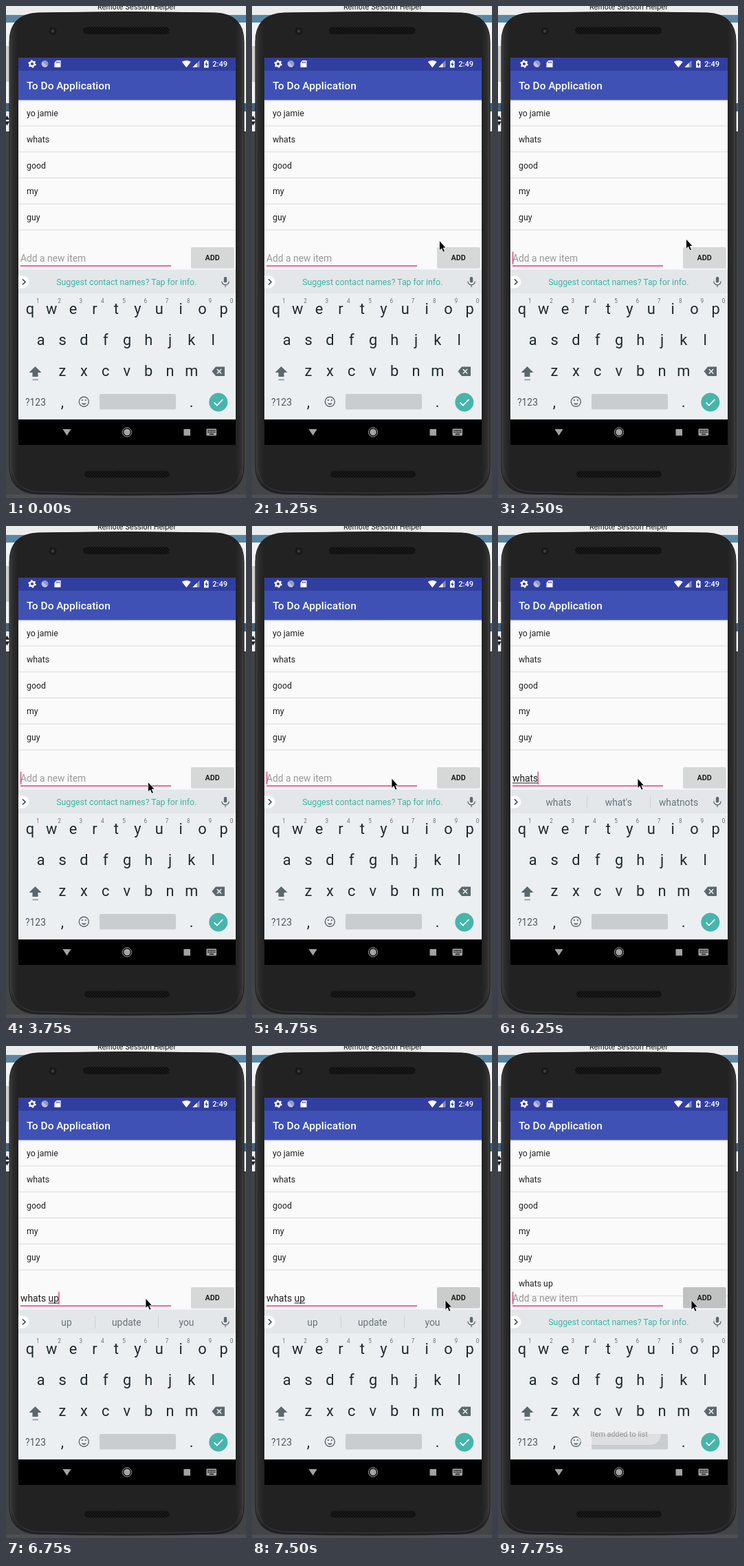
Recreate the animation shown at these times as an HTML page. Size 349x714 px, loop 8 s.

```html
<!DOCTYPE html>
<html lang="en">
<head>
<meta charset="utf-8">
<title>To Do Application</title>
<style>
html, body { margin: 0; width: 100%; height: 100%; overflow: hidden; background: #434446; }
svg { display: block; width: 349px; height: 714px; font-family: Roboto, Arial, sans-serif; }
text { white-space: pre; }
.mid { text-anchor: middle; }
.list { font-size: 12.3px; fill: #212121; }
.field { font-size: 13.84px; fill: #212121; }
.hint { fill: #999; }
.tip { font-size: 12.3px; fill: #3db3a6; }
.word { font-size: 13.84px; fill: #67747b; }
.key { font-size: 21.8px; fill: #1f2b31; }
.digit { font-size: 8.2px; fill: #667278; }
.mode { font-size: 13.9px; fill: #4c5960; }
.strong { font-weight: 500; }
</style>
</head>
<body>
<svg viewBox="0 0 349 714">
  <defs>
    <linearGradient id="body">
      <stop offset="0" stop-color="#454545"/>
      <stop offset=".012" stop-color="#2e2e2e"/>
      <stop offset=".035" stop-color="#222"/>
      <stop offset=".965" stop-color="#222"/>
      <stop offset=".988" stop-color="#2e2e2e"/>
      <stop offset="1" stop-color="#454545"/>
    </linearGradient>
    <linearGradient id="shade" x2="0" y2="1">
      <stop offset="0" stop-opacity=".09"/>
      <stop offset="1" stop-opacity="0"/>
    </linearGradient>
    <pattern id="mesh" width="4" height="4" patternUnits="userSpaceOnUse">
      <rect width="4" height="4" fill="#0e0e0e"/>
      <circle cx="1" cy="1" r=".8" fill="#272727"/>
      <circle cx="3" cy="3" r=".8" fill="#272727"/>
    </pattern>
  </defs>

  <g id="desktop"></g>
  <text x="133" y="5" font-family="Inter, Arial, sans-serif" font-size="10.4" fill="#111">Remote Session Helper</text>

  <path d="M5 52Q5 12 46 10Q175 7 305 10Q346 12 346 52V668Q346 706 306 708Q175 712 45 708Q5 706 5 668Z" fill="url(#body)" stroke="#1b1b1b"/>
  <path d="M9 672Q12 702 46 705Q175 708.500 305 705Q339 702 342 672" fill="none" stroke="#3b3b3b"/>
  <rect x="112" y="30.500" width="126" height="10.500" rx="5" fill="url(#mesh)"/>
  <rect x="114" y="674.500" width="124" height="10" rx="5" fill="url(#mesh)"/>
  <circle cx="68" cy="36.500" r="5.500" fill="#18191a"/>
  <circle cx="68" cy="36.500" r="2.200" fill="#35404a"/>

  <rect x="18" y="75" width="316" height="562" fill="#fafafa"/>
  <rect x="18" y="75" width="316" height="19" fill="#303f9f"/>
  <rect x="18" y="94" width="316" height="42.500" fill="#3f51b5"/>
  <rect x="18" y="136.500" width="316" height="2.500" fill="url(#shade)"/>
  <text class="strong" x="30" y="121" font-size="15.5" fill="#fff">To Do Application</text>
  <g fill="#fff" transform="translate(0 -.5)">
    <circle cx="38" cy="84.500" r="3.300" fill="none" stroke="#fff" stroke-width="2.400"/>
    <circle cx="38" cy="84.500" r="4.900" fill="none" stroke="#fff" stroke-width="1.700" stroke-dasharray="2.400 2.731"/>
    <circle cx="56.500" cy="84.500" r="5" fill="#8f99cf"/>
    <path d="M53 81A5 5 0 0 0 60 88Z" fill="#b9c0e2"/>
    <path d="M79.500 79.500H73.500L70.500 82.500V89.500H79.500Z"/>
    <path d="M73.500 81v2.500M75.500 81v2.500M77.500 81v2.500" stroke="#303f9f"/>
    <path d="M255.800 81.500Q262.300 77.500 268.800 81.500L262.300 89.700Z"/>
    <path d="M281.500 79.300V89.500H271.300Z" opacity=".4"/>
    <path d="M277.500 83.300V89.500H271.300Z"/>
    <path d="M290 79h2.600v1.200h2V90h-6.600V80.200h2Z"/>
    <path d="M291.800 81.500L289.200 85.800H291V88.800L293.600 84.500H291.800Z" fill="#303f9f"/>
    <text class="strong" x="300.300" y="88.500" font-size="11">2:49</text>
  </g>
  <g id="list"></g>
  <path d="M21 377.200H240" stroke="#e04079" stroke-width="1.500"/>
  <text class="field hint" id="hint" x="21" y="371">Add a new item</text>
  <text class="field" id="typed" x="21" y="371"></text>
  <path id="composing" stroke="#212121"/>
  <path id="caret" stroke="#e0447a" stroke-width="1.400"/>
  <rect x="269" y="351" width="62.500" height="30" rx="2" fill="#000" opacity=".13"/>
  <rect id="button" x="269" y="350" width="62.500" height="30" rx="2"/>
  <text class="mid" x="300.200" y="369" font-size="10.8" font-weight="700" fill="#212121">ADD</text>

  <rect x="18" y="382.500" width="316" height="217.500" fill="#eceff1"/>
  <rect x="18" y="382.500" width="316" height="34.500" fill="#e4e7e9"/>
  <path d="M18 391.500H24.500A9 9 0 0 1 24.500 409.500H18Z" fill="#fff"/>
  <path d="M24 396.500L28 400.500L24 404.500" fill="none" stroke="#37474f" stroke-width="1.600"/>
  <text class="tip mid" id="tip" x="175.300" y="405">Suggest contact names? Tap for info.</text>
  <g id="words"><path d="M129.500 391V410M221.500 391V410" stroke="#ccd1d4"/></g>
  <rect x="316.800" y="393" width="4.400" height="8.500" rx="2.200" fill="#5d6a71"/>
  <path d="M313.800 399.500A5.200 5.200 0 0 0 324.200 399.500M319 404.700V408" fill="none" stroke="#5d6a71" stroke-width="1.300"/>
  <g id="keys"></g>
  <g fill="#5c686e">
    <path d="M42.500 523L51.500 532H46.500V538H38.500V532H33.500Z"/>
    <rect x="38.500" y="541.500" width="8.500" height="1.800" fill="#93a0a6"/>
    <path d="M305 523.500H318V537H305L299.500 530.200Z"/>
    <path d="M306.800 527L313.200 533.500M313.200 527L306.800 533.500" stroke="#eceff1" stroke-width="1.600"/>
  </g>
  <g fill="none" stroke="#5c686e" stroke-width="1.400">
    <circle cx="113.300" cy="574.300" r="7"/>
    <path d="M109.500 576.500Q113.300 581 117.100 576.500Z" fill="#5c686e" stroke="none"/>
    <path d="M110.800 571v2M115.800 571v2" stroke-width="1.800"/>
  </g>
  <rect x="136" y="563" width="111" height="22.500" rx="2" fill="#c9cdcf"/>
  <circle cx="308.800" cy="575" r="13.500" fill="#48b5aa"/>
  <path d="M302.500 575.300L306.800 579.600L315.300 571" fill="none" stroke="#fff" stroke-width="1.700"/>

  <rect x="18" y="600" width="316" height="37"/>
  <g fill="#a3a3a3">
    <path d="M82.500 614H94.500L88.500 623.500Z"/>
    <circle cx="176" cy="618.500" r="4.800"/>
    <circle cx="176" cy="618.500" r="6.600" fill="none" stroke="#a3a3a3"/>
    <rect x="258.500" y="614" width="9.500" height="9.500"/>
    <rect x="291.500" y="613.500" width="14.500" height="10" rx="1.200"/>
    <path d="M293.500 616H304.500M293.500 618.500H304.500" stroke="#000" stroke-width="1.400" stroke-dasharray="1.500 .9"/>
    <path d="M295.800 621.300H302" stroke="#000" stroke-width="1.200"/>
  </g>
  <g id="toast" opacity=".55">
    <rect x="115" y="549" width="122" height="31" rx="15.500" opacity=".06"/>
    <rect x="115" y="548" width="122" height="31" rx="15.500" fill="#eee"/>
    <text class="mid" x="176" y="567" font-size="10.8" fill="#555">Item added to list</text>
  </g>
  <path id="pointer" d="M0 0V14.400L3.200 11.400L5.500 16.800L7.900 15.700L5.700 10.500H9.700Z" stroke="#fff" stroke-width=".8"/>
</svg>
<script>
const $ = id => document.getElementById(id);

function add(parent, tag, attrs, content = "") {
  const el = document.createElementNS("http://www.w3.org/2000/svg", tag);
  for (const k in attrs) el.setAttribute(k, attrs[k]);
  el.textContent = content;
  parent.appendChild(el);
  return el;
}
const show = (el, on) => { el.style.display = on ? "" : "none"; };

// Desktop strips that peek out around the phone: x, y, width, height, colour
[
  [0, 0, 349, 13, "#ececec"], [0, 13, 349, 11, "#5b86a3"],
  [0, 24, 349, 117, "#f3f3f3"], [0, 58, 8, 52, "#cfcdc9"],
  [0, 141, 349, 12, "#3f6484"], [0, 153, 349, 29, "#f4f4f4"],
  [0, 182, 349, 532, "#434446"], [0, 709, 349, 5, "#4c4f54"]
].forEach(([x, y, width, height, fill]) => add($("desktop"), "rect", { x, y, width, height, fill }));
add($("desktop"), "path", { d: "M-2 165L1.500 159L5 165ZM-2 167.500L1.500 173.500L5 167.500Z", fill: "#222" });

const rows = ["yo jamie", "whats", "good", "my", "guy", "whats up"].map((item, i) => {
  const row = add($("list"), "g", {}), y = 160 + i * 37.75;
  add(row, "text", { class: "list", x: 30, y }, item);
  add(row, "path", { d: `M18 ${y + 14}H334`, stroke: "#dadada" });
  return row;
});

const words = [88, 175.3, 262.5].map(x => add($("words"), "text", { class: "word mid", x, y: 405.5 }));

[["qwertyuiop", 35, 446.5], ["asdfghjkl", 50.8, 491.5], ["zxcvbnm", 82, 537]].forEach(([letters, x, y], r) =>
  [...letters].forEach((c, i) => {
    const kx = x + i * 31.3;
    add($("keys"), "text", { class: "key mid", x: kx, y }, c);
    if (!r) add($("keys"), "text", { class: "digit mid", x: kx + 11.3, y: 431 }, (i + 1) % 10);
  }));
add($("keys"), "text", { class: "mode", x: 28, y: 579.5 }, "?123");
add($("keys"), "text", { class: "key mid", x: 82, y: 582 }, ",");
add($("keys"), "text", { class: "key mid", x: 269.5, y: 582 }, ".");

// Each step changes only the properties it lists; mark = start of the underlined part
const start = { caret: false, pos: null, text: "", mark: -1, words: null, button: "#d6d7d7", done: false };
const steps = [
  [500, { caret: true }],
  [1000, { caret: false, pos: [280.5, 339.5] }],
  [1250, { pos: [272.5, 340.5] }],
  [1500, { caret: true }],
  [1750, { pos: [267.5, 340.5] }],
  [2000, { caret: false, pos: [273.5, 341.5] }],
  [2250, { pos: [273.5, 338] }],
  [2500, { caret: true }],
  [3000, { caret: false }],
  [3500, { caret: true, pos: [263.5, 339.5] }],
  [3750, { pos: [206.5, 371.5] }],
  [4000, { caret: false, pos: [209, 369.5] }],
  [4500, { caret: true }],
  [4750, { pos: [203, 366.2] }],
  [5000, { text: "wh", mark: 0 }],
  [5250, { text: "what", words: ["what", "what's", "whatever"] }],
  [5500, { text: "what ", mark: -1, words: ["is", "are", "the"] }],
  [5750, { text: "what up", mark: 5, words: ["up", "update", "you"] }],
  [6250, { text: "whats", mark: 0, words: ["whats", "what's", "whatnots"] }],
  [6500, { text: "whats ", mark: -1, words: ["up", "is", "the"] }],
  [6750, { text: "whats up", mark: 6, words: ["up", "update", "you"] }],
  [7250, { caret: false, pos: [280.8, 370.5] }],
  [7500, { pos: [281, 368.5], button: "#cacbcb" }],
  [7750, { caret: true, text: "", mark: -1, words: null, button: "#c0c1c1", done: true }]
];

function render(t) {
  const s = Object.assign({}, start, ...steps.filter(([at]) => at <= t).map(([, change]) => change));
  const typed = $("typed");
  typed.textContent = s.text;
  const end = 21 + (s.text ? typed.getComputedTextLength() : .6);
  show($("hint"), !s.text);
  show($("caret"), s.caret);
  $("caret").setAttribute("d", `M${end} 356.500V375`);
  show($("composing"), s.mark >= 0);
  if (s.mark >= 0) {
    const from = s.mark ? 21 + typed.getSubStringLength(0, s.mark) : 21;
    $("composing").setAttribute("d", `M${from} 373H${end}`);
  }
  show($("tip"), !s.words);
  show($("words"), s.words);
  if (s.words) words.forEach((el, i) => { el.textContent = s.words[i]; });
  $("button").setAttribute("fill", s.button);
  show(rows[5], s.done);
  show($("toast"), s.done);
  show($("pointer"), s.pos);
  if (s.pos) $("pointer").setAttribute("transform", `translate(${s.pos})`);
}

function loop() {
  render(performance.now() % 8000);
  requestAnimationFrame(loop);
}
loop();
</script>
</body>
</html>
```
